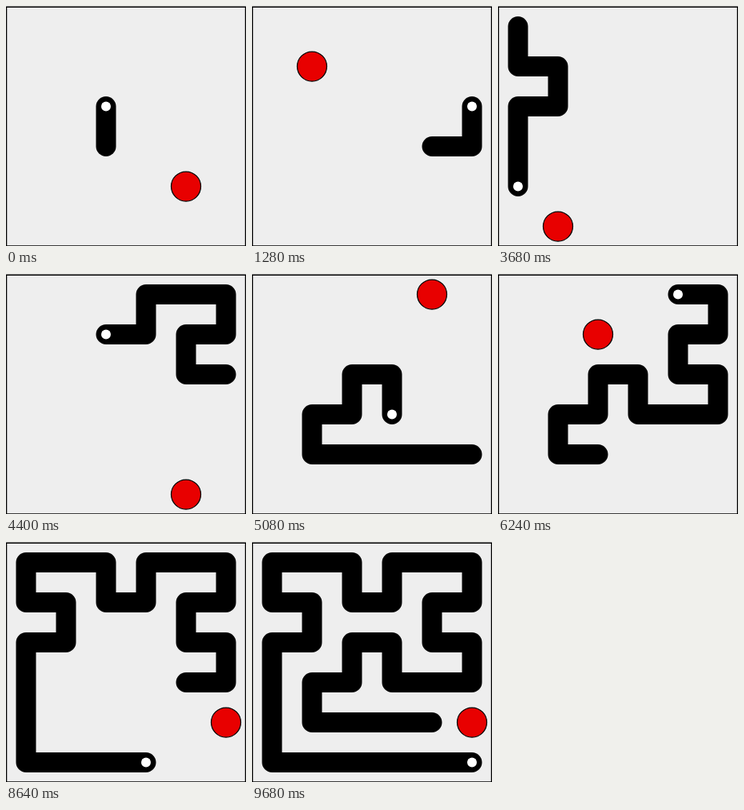
An HTML page with a canvas for the animation above (9.72 s loop, 300 by 300 pixels).

```html
<!DOCTYPE html>
<html lang="en">
<head>
<meta charset="utf-8">
<title>Snake</title>
<style>
  html, body { margin: 0; width: 100%; height: 100%; overflow: hidden; background: #eee; }
  canvas { display: block; width: 300px; height: 300px; }
</style>
</head>
<body>
<canvas id="stage" width="300" height="300"></canvas>
<script>
const ctx = document.getElementById('stage').getContext('2d');
const LOOP = 9720, TICK = 40, CELL = 50, START_LENGTH = 2;

// Closed tour through all 36 cells, as moves from column 5, row 4.
const MOVES = 'LLLLURURDRRULURULLDLULLDRDLDDDRRRRR';
const STEP = { L: [-1, 0], R: [1, 0], U: [0, -1], D: [0, 1] };
const tour = [[5, 4]];
for (const move of MOVES) {
  const [x, y] = tour[tour.length - 1];
  tour.push([x + STEP[move][0], y + STEP[move][1]]);
}

// Key meals [count, distance along the tour]; gaps shrink as the board fills.
const LAST = 360;
const MEALS = [[0, 37], [3, 108], [5, 139], [8, 197], [13, 236], [17, 284], [33, LAST]];
const foods = [];
for (let k = 1; k < MEALS.length; k++) {
  const [n0, d0] = MEALS[k - 1], [n1, d1] = MEALS[k];
  const from = Math.sqrt(LAST - d0), to = Math.sqrt(LAST - d1);
  for (let n = n0; n < n1; n++) {
    const root = from + (to - from) * (n - n0) / (n1 - n0);
    foods.push(Math.floor(LAST - root * root + 0.01));
  }
}
foods.push(LAST);

// Three cells every two ticks, easing in at first and slowing as the snake grows.
function headAt(tick) {
  return Math.floor(1.5 * tick + 7 * Math.exp(-tick / 12) - 3.5 * (tick / 242) ** 3);
}

function center(distance) {
  return tour[distance % tour.length].map(v => (v + 0.5) * CELL);
}

function disc([x, y], radius, color) {
  ctx.beginPath();
  ctx.arc(x, y, radius, 0, Math.PI * 2);
  ctx.fillStyle = color;
  ctx.fill();
}

function draw(tick) {
  const head = headAt(tick);
  const eaten = foods.filter(d => d <= head).length;
  const tail = head - (START_LENGTH + eaten) + 1;

  ctx.fillStyle = '#eee';
  ctx.fillRect(0, 0, 300, 300);
  ctx.strokeStyle = '#000';
  ctx.lineWidth = 1.5;
  ctx.lineJoin = 'miter';
  ctx.strokeRect(0.5, 1.25, 299, 298.75);

  ctx.save();
  ctx.translate(0, 0.5);
  disc(center(foods[eaten]), 18.5, '#e80000');
  ctx.lineWidth = 1.25;
  ctx.stroke();

  ctx.beginPath();
  for (let d = tail; d <= head; d++) ctx.lineTo(...center(d));
  ctx.lineWidth = 25;
  ctx.lineCap = ctx.lineJoin = 'round';
  ctx.stroke();
  disc(center(head), 6, '#fff');
  ctx.restore();
}

const start = performance.now();
function frame() {
  const time = (performance.now() - start) % LOOP;
  draw(Math.floor(time / TICK));
  requestAnimationFrame(frame);
}
frame();
</script>
</body>
</html>
```
